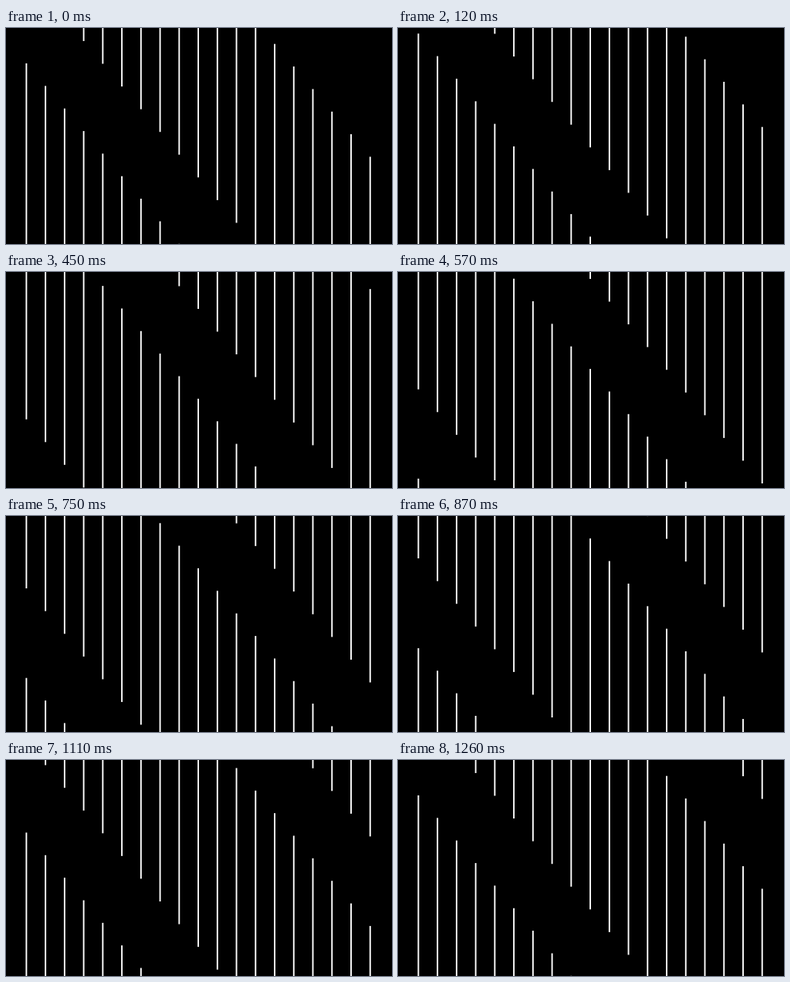
Animation, 500 px wide and 281 px high, one loop 1.29 s. Source, as an HTML page with a canvas:

```html
<!DOCTYPE html>
<html lang="en">
<head>
<meta charset="utf-8">
<title>Falling lines</title>
<style>
  html, body { margin: 0; width: 100%; height: 100%; overflow: hidden; background: #000; }
  canvas { display: block; width: 500px; height: 281px; }
</style>
</head>
<body>
<canvas id="stage" width="500" height="281"></canvas>
<script>
const W = 500, H = 281;
const LOOP = 1290, STEP = 30;
const CYCLE = 1260;      // time between two dashes on one line
const LAG = 90.9;        // delay from one line to the next
const LINES = 19, X0 = 26.4, GAP = 24.74, THICK = 1.9;

const ctx = document.getElementById('stage').getContext('2d');

// The two ends of a dash rise at slightly different speeds.
const headY = u => 46 - 0.3229 * u;
const tailY = u => -71.7 - 0.3252 * (u - CYCLE);

function draw(t) {
  ctx.fillStyle = '#000';
  ctx.fillRect(0, 0, W, H);
  ctx.fillStyle = '#fff';
  for (let i = 0; i < LINES; i++) {
    const x = X0 + i * GAP - THICK / 2;
    for (let k = -1; k <= 1; k++) {
      const u = t - i * LAG + k * CYCLE;
      const top = Math.max(0, headY(u));
      const bottom = Math.min(H, tailY(u));
      if (bottom > top) ctx.fillRect(x, top, THICK, bottom - top);
    }
  }
}

const start = performance.now();
function tick() {
  const t = (performance.now() - start) % LOOP;
  draw(Math.floor(t / STEP) * STEP);
  requestAnimationFrame(tick);
}
tick();
</script>
</body>
</html>
```
